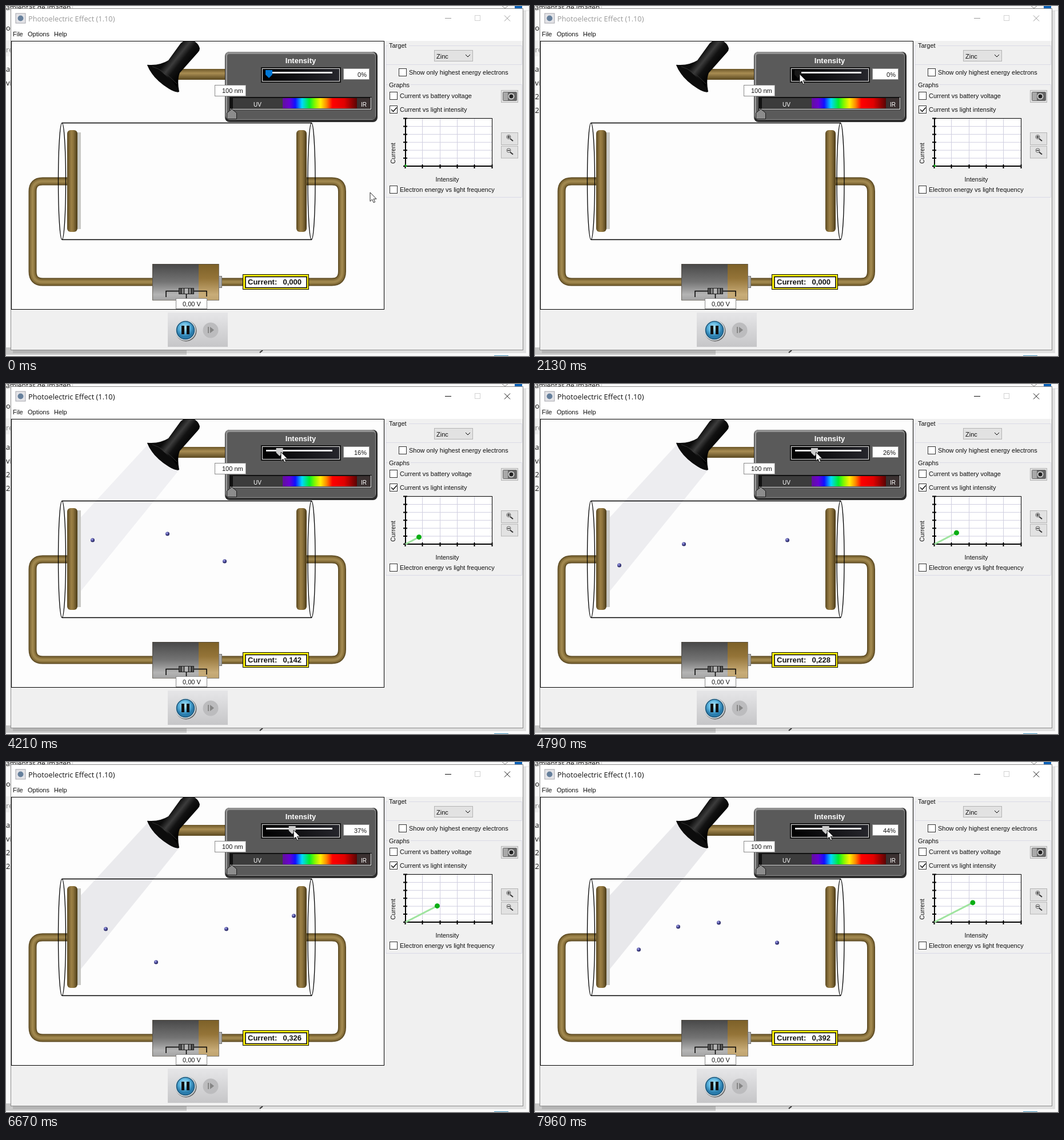
Recreate the animation shown at these times as an HTML page. Size 915 by 612 pixels, loop 8000 ms.

```html
<!DOCTYPE html>
<html lang="en">
<head>
<meta charset="utf-8">
<title>Photoelectric Effect</title>
<style>
html, body { margin: 0; width: 100%; height: 100%; overflow: hidden; background: #fff; }
svg { display: block; width: 915px; height: 612px; }
text { font: 11px "Liberation Sans", Arial, sans-serif; fill: #111; white-space: pre; }
.ui { font: 12.8px "Open Sans", sans-serif; }
.bold { font-weight: bold; font-size: 13px; }
.pipe path { fill: none; stroke-linejoin: round; }
.field { fill: #fff; stroke: #8a8a8a; }
.group { fill: none; stroke: #dadae6; }
.btn { fill: #e2e2e2; stroke: #b4b4b4; }
.thin { fill: none; stroke: #000; }
</style>
</head>
<body>
<svg viewBox="0 0 915 612">
<defs>
  <linearGradient id="rod"><stop stop-color="#5c4a22"/><stop offset=".4" stop-color="#9c8046"/><stop offset=".6" stop-color="#8d733c"/><stop offset="1" stop-color="#4a3a18"/></linearGradient>
  <linearGradient id="arm" x2="0" y2="1"><stop stop-color="#6b5628"/><stop offset=".4" stop-color="#a88c52"/><stop offset="1" stop-color="#5a4820"/></linearGradient>
  <linearGradient id="steel" x2="0" y2="1"><stop stop-color="#484848"/><stop offset=".5" stop-color="#747474"/><stop offset=".85" stop-color="#b4b4b4"/><stop offset="1" stop-color="#a4a4a4"/></linearGradient>
  <linearGradient id="brass" x2="0" y2="1"><stop stop-color="#7c6028"/><stop offset=".4" stop-color="#947438"/><stop offset=".85" stop-color="#c8ac78"/><stop offset="1" stop-color="#c0a470"/></linearGradient>
  <linearGradient id="knob"><stop stop-color="#444"/><stop offset=".5" stop-color="#bbb"/><stop offset="1" stop-color="#444"/></linearGradient>
  <linearGradient id="lamp" gradientUnits="userSpaceOnUse" x1="290" y1="84" x2="320" y2="108"><stop stop-color="#0c0c0c"/><stop offset=".3" stop-color="#3c3c3c"/><stop offset=".55" stop-color="#121212"/><stop offset="1"/></linearGradient>
  <linearGradient id="dark"><stop stop-color="#000"/><stop offset="1" stop-color="#26262c"/></linearGradient>
  <linearGradient id="tray" x2="0" y2="1"><stop stop-color="#e6e6e8"/><stop offset="1" stop-color="#c6c6c8"/></linearGradient>
  <linearGradient id="spectrum" gradientUnits="userSpaceOnUse" x1="484" x2="614">
    <stop stop-color="#60109c"/><stop offset=".09" stop-color="#6a00d0"/><stop offset=".17" stop-color="#1010ff"/><stop offset=".26" stop-color="#00d8ff"/><stop offset=".36" stop-color="#00ee30"/><stop offset=".43" stop-color="#80f800"/><stop offset=".51" stop-color="#fff000"/><stop offset=".59" stop-color="#ff8a00"/><stop offset=".67" stop-color="#f00"/><stop offset=".83" stop-color="#e00000"/><stop offset="1" stop-color="#5a0404"/>
  </linearGradient>
  <radialGradient id="blue" cx=".45" cy=".35"><stop stop-color="#b4e4f6"/><stop offset=".6" stop-color="#5cb4de"/><stop offset="1" stop-color="#2a7cac"/></radialGradient>
  <radialGradient id="ball" cx=".38" cy=".35"><stop stop-color="#c0c0f4"/><stop offset=".5" stop-color="#6060b4"/><stop offset="1" stop-color="#30306c"/></radialGradient>
  <clipPath id="stage"><rect x="10" y="62" width="651" height="468"/></clipPath>
  <clipPath id="plot"><rect x="698" y="197" width="153" height="84"/></clipPath>
</defs>

<!-- desktop behind the window -->
<rect width="915" height="612" fill="#fafafa"/>
<path d="M0 8H915" stroke="#e4e4e4"/>
<text x="0" y="7" class="ui" style="font-size:12px">amientas de imagen</text>
<path d="M116.500 0V4" stroke="#ccc"/>
<path d="M890 0h13v5h-13z" fill="#0a62b8"/>
<path d="M868 0l5 4l5-4" fill="none" stroke="#888"/>
<rect y="60" width="9" height="28" fill="#f0f0f0"/>
<g id="margin"></g>
<rect y="597" width="316" height="13" fill="#c8c8c8"/>
<rect x="316" y="597" width="130" height="13" fill="#ececec"/>
<path d="M444 606l5-4" stroke="#333" stroke-width="2"/>
<path d="M854 611.500h25" stroke="#3f8fb8"/>
<path d="M905 8h5V607H12v-5" fill="#000" opacity=".1"/>

<!-- window chrome -->
<rect x="8.500" y="4.500" width="896" height="597" fill="#f0f0f0" stroke="#8a8a8a"/>
<rect x="9" y="5" width="895" height="56" fill="#fff"/>
<rect x="17" y="13" width="17" height="17" fill="#e4e4e8" stroke="#a4a4aa"/>
<circle cx="25.500" cy="21.500" r="5" fill="#66809c"/>
<text id="title" class="ui" x="39" y="26.500">Photoelectric Effect (1.10)</text>
<g id="controls" fill="none"><path d="M768 21.500h11M872 16.500l10 10m0-10l-10 10"/></g>
<rect x="820.500" y="16.500" width="9" height="9" fill="none" stroke="#d2d2d2"/>
<text y="53"><tspan x="12">File</tspan><tspan x="38">Options</tspan><tspan x="84">Help</tspan></text>

<!-- experiment -->
<rect x="9.500" y="61.500" width="652" height="469" fill="#fdfdfd" stroke="#000"/>
<g clip-path="url(#stage)">
  <rect x="124" y="221" width="7" height="169" fill="#c8c8c4"/>
  <path id="beam" d="M248 106L303 150L131 362V233Z" fill="#b4b4c0"/>
  <g class="pipe" id="pipes"></g>
  <rect x="107" y="217" width="18" height="178" rx="6" fill="url(#rod)"/>
  <rect x="508" y="217" width="18" height="178" rx="6" fill="url(#rod)"/>
  <path class="thin" stroke-width="1.300" d="M98 204.500H535M98 408.500H535"/>
  <ellipse class="thin" stroke-width="1.300" cx="98" cy="306.500" rx="6.500" ry="102"/>
  <ellipse class="thin" stroke-width="1.300" cx="534.500" cy="306.500" rx="6.500" ry="102"/>
  <g id="electrons"></g>
  <rect x="298" y="110" width="88" height="19" fill="url(#arm)"/>
  <path d="M247 103Q270 104 284 95L305 66Q310 60 322 59Q336 62 339 74Q339 78 336 81L304 117Q299 130 303 150Q297 152 286 145Q256 127 247 103Z" fill="url(#lamp)"/>
  <path d="M247 103Q252 101 273 116Q299 138 303 150Q297 152 284 144Q257 127 247 103Z" fill="#0c0c0c"/>
  <path d="M256 106Q275 111 299 136" fill="none" stroke="#333"/>

  <!-- battery and meter -->
  <rect x="256" y="451" width="81" height="63" fill="url(#steel)"/>
  <rect x="337" y="451" width="35" height="63" fill="url(#brass)"/>
  <rect x="256.500" y="451.500" width="116" height="63" fill="none" stroke="#4a4438" opacity=".7"/>
  <rect x="372.500" y="472.500" width="5" height="20" fill="#aaa" stroke="#777"/>
  <path class="thin" stroke-width="1.500" d="M280 509V498.500H351V508M315.500 498V511"/>
  <rect x="302.500" y="493.500" width="26" height="10" fill="url(#knob)" stroke="#222"/>
  <path class="thin" d="M306.500 494v9M311.500 494v9M319.500 494v9M324.500 494v9"/>
  <rect class="field" x="297.500" y="511.500" width="54" height="18"/>
  <text x="309" y="525">0,00 V</text>
  <rect x="414.500" y="469.500" width="115" height="26" fill="#fff200" stroke="#000"/>
  <rect x="419" y="473.500" width="107" height="19" fill="#fff" stroke="#000" stroke-width="1.500"/>
  <text class="bold" x="423" y="487">Current:</text>
  <text class="bold" id="current" x="517" y="487" text-anchor="end"></text>

  <!-- light control -->
  <rect x="383" y="80" width="267" height="123" rx="8" fill="#2c2c2c"/>
  <rect x="384" y="80" width="263" height="119" rx="7" fill="#929292"/>
  <rect x="387" y="84" width="259" height="114" rx="4" fill="#5a5a5a"/>
  <text class="bold" x="515.500" y="100" text-anchor="middle" style="fill:#fff">Intensity</text>
  <rect x="446.500" y="107.500" width="139" height="26" fill="#222" stroke="#111"/>
  <rect x="448.500" y="109.500" width="135" height="22" fill="url(#dark)" stroke="#e4e4e4"/>
  <rect x="455" y="115" width="116" height="3" fill="#e8e8e8"/>
  <path id="thumb" d="M-6 -7H6V1L0 7L-6 1Z"/>
  <rect class="field" x="590.500" y="109.500" width="45" height="19"/>
  <text id="percent" x="631" y="123.500" text-anchor="end"></text>
  <rect x="391" y="159" width="249" height="23" fill="#111"/>
  <path d="M392 180.500H638.500V160" fill="none" stroke="#d8d8d8" stroke-width="1.500"/>
  <rect x="397" y="161" width="240" height="18" fill="#3c3c3c"/>
  <rect x="484" y="161" width="130" height="18" fill="url(#spectrum)"/>
  <rect x="614" y="161" width="23" height="18" fill="#3a3030"/>
  <text y="176" style="fill:#fff;font-size:10px"><tspan x="433">UV</tspan><tspan x="621">IR</tspan></text>
  <path d="M386.500 197.500V187L395 180L403.500 187V197.500Z" fill="#8c8c8c" stroke="#1a1a1a"/>
  <rect class="field" x="365.500" y="138.500" width="54" height="19"/>
  <text x="378" y="152">100 nm</text>
</g>

<!-- clock buttons -->
<rect x="283" y="536" width="105" height="60" fill="url(#tray)"/>
<circle cx="315" cy="568" r="18.500" fill="#666"/>
<circle cx="314" cy="567" r="18" fill="#d4dce0"/>
<circle cx="314" cy="567" r="15.500" fill="url(#blue)" stroke="#1c5478" stroke-width="1.500"/>
<path d="M307 559h5v15h-5zM316 559h5v15h-5z" fill="#111"/>
<circle cx="358" cy="567" r="13.500" fill="#bcbcbe"/>
<path d="M353 561h2v11h-2zM357 561l7 5.500l-7 5.500z" fill="#858585"/>

<!-- side panel -->
<path class="group" d="M668 69.500h-3.500V102.500H902.500V69.500H705M668 137.500h-3.500V334.500H902.500V137.500H708M664.500 102.500V137.500"/>
<text x="670" y="73">Target</text>
<rect class="btn" x="749.500" y="77.500" width="67" height="19"/>
<text x="753" y="91.500">Zinc</text>
<path class="thin" stroke="#555" d="M804 85l4 4l4-4"/>
<text x="670" y="141.500">Graphs</text>
<g id="checks"></g>
<path class="thin" stroke-width="1.400" d="M674 181l3.500 3.500l6-7"/>
<rect class="btn" x="866.500" y="147.500" width="29" height="21"/>
<rect x="869" y="150" width="25" height="16" rx="2" fill="#666"/>
<rect x="870" y="151" width="8" height="14" fill="#a8a8a8"/>
<circle cx="884" cy="158" r="5.500" fill="#ccc"/><circle cx="884" cy="158" r="3.500" fill="#222"/>
<g id="zooms"></g>
<rect x="698" y="197" width="153" height="83" fill="#fff"/>
<path id="grid" stroke="#d0cfe0" fill="none"/>
<rect class="thin" x="698.500" y="196.500" width="152" height="83.500"/>
<path id="ticks" class="thin" stroke-width="2"/>
<g clip-path="url(#plot)">
  <path id="trace" stroke="#9fe49f" stroke-width="3"/>
  <circle id="dot" fill="#0aae14"/>
</g>
<text transform="translate(681 257.500) rotate(-90)" text-anchor="middle">Current</text>
<text x="772" y="307" text-anchor="middle">Intensity</text>

<path id="cursor" d="M0 0V15.500L3.600 12.200L6.200 17.800L8.600 16.700L6.100 11.300H11Z" fill="#fff" stroke="#111" stroke-width=".9"/>
</svg>
<script>
const LOOP = 8000;
const $ = id => document.getElementById(id);
const set = (id, attrs) => { for (const k in attrs) $(id).setAttribute(k, attrs[k]); };
const times = (n, fn) => Array.from({ length: n }, (_, i) => fn(i)).join('');

// Piecewise linear track: rows of [time, value, ...]
function track(rows, t) {
  if (t <= rows[0][0]) return rows[0].slice(1);
  const i = rows.findIndex(r => r[0] > t);
  if (i < 0) return rows[rows.length - 1].slice(1);
  const a = rows[i - 1], b = rows[i], k = (t - a[0]) / (b[0] - a[0]);
  return a.slice(1).map((v, j) => v + (b[j + 1] - v) * k);
}

const CURRENT = [[3090, 0], [3540, .042], [4790, .228], [5880, .291], [6670, .326], [7960, .392]];
const POINTER = [[130, 637, 326], [580, 577, 246], [750, 577, 246], [1540, 473, 119],
  [1630, 473, 119], [1710, 470, 120], [2090, 470, 120], [2130, 463, 119]];

// Electrons: [time, x, y] of one known point on each horizontal flight
const SPEED = .5, LEFT = 127, RIGHT = 508;
const FLIGHTS = [
  [3700, 127, 310], [3900, 127, 262], [4790, 441, 273], [4790, 260, 280], [4790, 147, 317],
  [5050, 127, 335], [5880, 390, 344], [5880, 298, 353], [5880, 185, 299],
  [6670, 503, 269], [6670, 385, 292], [6670, 262, 350], [6670, 174, 292],
  [6820, 127, 325], [7080, 127, 276],
  [7960, 423, 316], [7960, 321, 281], [7960, 250, 288], [7960, 181, 328]
];

function build() {
  const wires = 'M108 306.5H64Q46.500 306.500 46.500 324V464Q46.500 482.500 64 482.500H257' +
    'M378 482.500H570Q588 482.500 588 464V324Q588 306.500 570 306.500H525';
  $('pipes').innerHTML = [[14, '#5e4c24'], [11, '#786232'], [8, '#8c743e'], [4, '#a0874e']]
    .map(([w, c]) => `<path d="${wires}" stroke="${c}" stroke-width="${w}"/>`).join('');

  $('checks').innerHTML = [
    [687, 116, 'Show only highest energy electrons'], [671, 157, 'Current vs battery voltage'],
    [671, 181, 'Current vs light intensity'], [671, 321, 'Electron energy vs light frequency']
  ].map(([x, y, label]) => `<rect x="${x + .5}" y="${y - 6.5}" width="13" height="13" fill="#fff" stroke="#333"/>
    <text x="${x + 18}" y="${y + 4}">${label}</text>`).join('');

  $('zooms').innerHTML = [[232, 'M877 229h5M879.500 226.500v5'], [255.5, 'M877 252.500h5']]
    .map(([y, sign]) => `<rect class="btn" x="866.500" y="${y - 10.5}" width="29" height="21"/>
      <path d="M882 ${y}l5 4" stroke="#333" stroke-width="2"/>
      <circle cx="879.500" cy="${y - 3}" r="3.500" fill="#ddd" stroke="#666"/>
      <path d="${sign}" stroke="#111"/>`).join('');

  const gx = i => 698.5 + Math.round(i * 30.3), gy = i => 280 - i * 13.9;
  set('grid', { d: times(4, i => `M${gx(i + 1)} 197V280`) + times(5, i => `M698 ${gy(i + 1)}H850`) });
  set('ticks', { d: 'M699 196V281M697 280H851' +
    times(6, i => `M${gx(i)} 277V284`) + times(7, i => `M695 ${gy(i)}H702`) });

  $('margin').innerHTML = [['o', 43], ['re', 81, '#888'], ['as', 115], ['vi', 139], ['20', 163], ['20', 187]]
    .map(([s, y, color = '#111']) => `<text x="0" y="${y}" class="ui" style="fill:${color}">${s}</text>`).join('');
}

function render(t) {
  const [current] = track(CURRENT, t);
  const level = current / .0089;
  const active = t >= 2330;
  const [px, py] = active ? [463 + Math.min(1, level) + 1.07 * level, 119] : track(POINTER, t);
  const thumbX = active ? px - 2.5 : 460;

  [...$('margin').children].slice(4).forEach(n => { n.style.display = t < 130 ? 'none' : ''; });
  $('title').style.fill = active ? '#111' : '#999';
  set('controls', { stroke: active ? '#111' : '#999' });
  set('cursor', { transform: `translate(${px} ${py})` });
  set('thumb', {
    transform: `translate(${thumbX} 119)`,
    fill: active ? '#ccc' : t >= 2130 ? '#171717' : '#0078d7'
  });
  set('beam', { opacity: level > 0 ? Math.min(.12, level * .03) + .4 * level / 100 : 0 });
  $('percent').textContent = Math.round(level) + '%';
  $('current').textContent = current.toFixed(3).replace('.', ',');

  const gx = 698 + 1.54 * level, gy = 280 - 87 * current;
  set('trace', { d: level > 1 ? `M699 280L${gx} ${gy}` : '' });
  set('dot', { cx: gx, cy: gy, r: level > 0 ? 4.5 : 3 });

  $('electrons').innerHTML = FLIGHTS.map(([t0, x0, y]) => {
    const x = x0 + (t - t0) * SPEED;
    return x >= LEFT && x <= RIGHT ? `<circle cx="${x}" cy="${y}" r="3.500" fill="url(#ball)"/>` : '';
  }).join('');
}

build();
const start = performance.now();
function tick() {
  render((performance.now() - start) % LOOP);
  requestAnimationFrame(tick);
}
tick();
</script>
</body>
</html>
```
